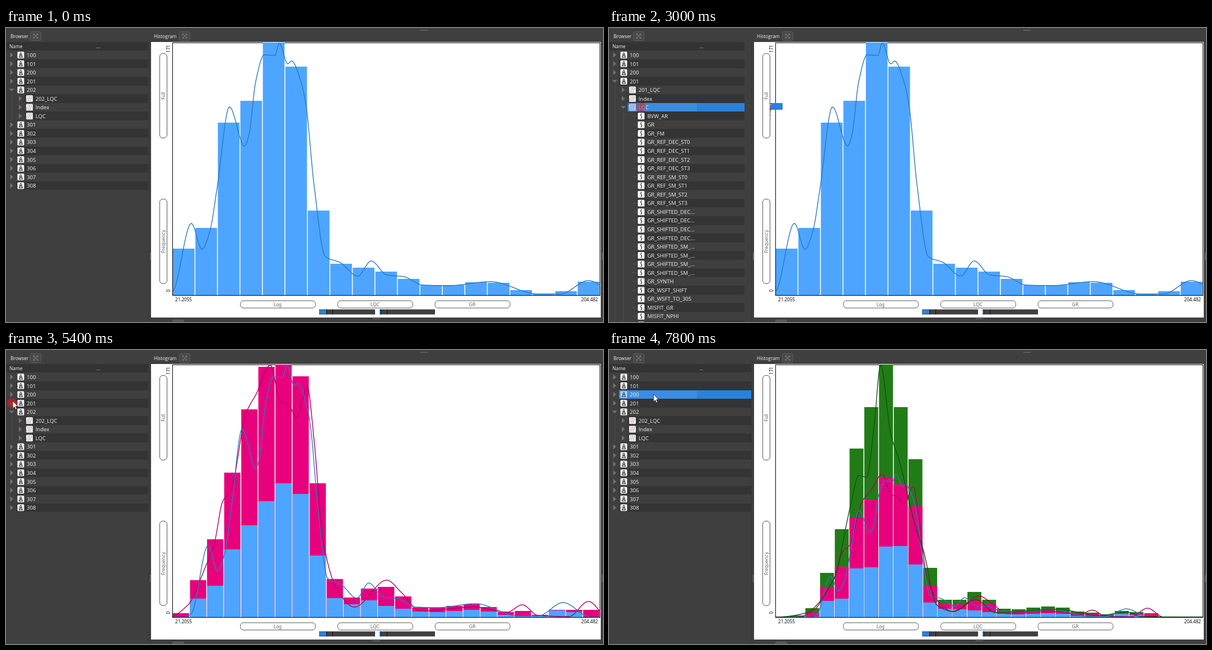
An HTML page for the animation above (8000 ms loop, 1066x525 px).

```html
<!DOCTYPE html>
<html lang="en">
<head>
<meta charset="utf-8">
<title>Histogram browser</title>
<style>
html, body { margin: 0; width: 100%; height: 100%; overflow: hidden; background: #3f3f3f; }
svg { display: block; width: 100%; height: 100%; }
text { font-family: "Open Sans", "Noto Sans", sans-serif; white-space: pre; }
.row { font-size: 9.55px; fill: #f4f4f4; }
.head { font-size: 8.4px; fill: #f4f4f4; }
.axis { font-size: 8.1px; fill: #000; }
.pill { font: 8px "DejaVu Sans", sans-serif; fill: #666; text-anchor: middle; }
</style>
</head>
<body>
<svg id="stage" viewBox="0 0 1066 525"></svg>
<script>
const NS = "http://www.w3.org/2000/svg";
const stage = document.getElementById("stage");

function add(parent, tag, attrs = {}, text) {
  const el = document.createElementNS(NS, tag);
  for (const k in attrs) el.setAttribute(k, attrs[k]);
  if (text !== undefined) el.textContent = text;
  parent.appendChild(el);
  return el;
}
const group = (parent = stage, attrs) => add(parent, "g", attrs);
const rect = (p, x, y, width, height, fill, more) => add(p, "rect", { x, y, width, height, fill, ...more });
const line = (p, d, stroke, width = 1) => add(p, "path", { d, fill: "none", stroke, "stroke-width": width });
const label = (p, cls, x, y, text, more) => add(p, "text", { class: cls, x, y, ...more }, text);
const show = (el, on) => { el.style.display = on ? "" : "none"; };

// ---------- window chrome ----------
const LIGHT = "#3f3f3f", DARK = "#343434", BLUE = "#2a82da";

function dockTitle(text, x, iconX) {
  label(stage, "head", x, 18.3, text);
  rect(stage, iconX + .5, 6.5, 19, 16, "#484848", { rx: 2, stroke: "#5c5c5c" });
  const c = iconX + 10;
  line(stage, `M${c - 3.5} 11l7 7M${c + 3.5} 11l-7 7`, "#8a8a8a");
  line(stage, `M${c - 4} 13v-2.5h2.5M${c + 4} 13v-2.5h-2.5M${c - 4} 16v2.5h2.5M${c + 4} 16v2.5h-2.5`, "#8a8a8a", .8);
}
function grip(x, y, vertical) {
  for (let i = 0; i < 6; i++)
    rect(stage, x + (vertical ? 0 : i * 2.3), y + (vertical ? i * 2.3 : 0), 1.2, 1.2, "#a0a0a0");
}

rect(stage, 0, 0, 1066, 525, LIGHT);
rect(stage, 254, 24, 1, 501, "#383838");
dockTitle("Browser", 8, 43);
dockTitle("Histogram", 264, 309);
grip(740, 3.5);
grip(655, 518.5);
grip(257, 401.5, true);
grip(1064, 401.5, true);
rect(stage, 297.5, 521.5, 20, 10, "#555", { rx: 2, stroke: "#6a6a6a" });

// ---------- tree ----------
const ROW = 15.55, TOP = 40.5, INDENT = 15.6;

function icon(g, level, x, y) {
  rect(g, x - 6, y - 6, 12, 12, "#f6f6f6", { rx: 1.5 });
  if (level === 0) {
    line(g, `M${x - 3} ${y + 4}l2.2 -8h1.6l2.2 8M${x - 3.6} ${y + 4}h7.2M${x - 1.6} ${y - .6}h3.2l-3.6 3.6M${x - 1.6} ${y - .6}l3.6 3.6`, "#333");
  } else if (level === 1) {
    ["#d88", "#999", "#89b"].forEach((c, i) => line(g, `M${x - 3.5 + i * 3} ${y - 5}q3 2.5 0 5t0 5`, c, .9));
  } else {
    line(g, `M${x + 1} ${y - 4.5}q-3 2.5 -.8 4.5t-.8 4.5`, "#222", 1.1);
  }
}

function makeTree(rows, width, sel) {
  const g = group(), picked = [];
  rect(g, 1, 25, width - 1, 15, "#333");
  label(g, "head", 6, 36, "Name");
  label(g, "head", 161.5, 36, "...");
  rows.forEach(([level, text, open], i) => {
    const top = TOP + i * ROW, y = top + ROW / 2, x = 18 + level * INDENT, ax = 10 + level * 15.5;
    const y0 = Math.round(top), h = Math.round(top + ROW) - y0;
    rect(g, x, y0, width - x, h, i % 2 ? DARK : LIGHT);
    if (i === sel)
      picked.push(rect(g, x, y0, width - x, h, BLUE), rect(g, x, y0, 157 - x, h, "#3a8de0"));
    for (let k = 0; k < level; k++) line(g, `M${10.5 + k * 15.5} ${top}v${ROW}`, "#545454", .8);
    if (level === 2) line(g, `M41.5 ${y}h9`, "#545454", .8);
    else add(g, "path", {
      d: open ? `M${ax - 4.8} ${y - 2.3}h9.6l-4.8 5z` : `M${ax - 2.6} ${y - 4.8}v9.6l5.6 -4.8z`,
      fill: "#707070"
    });
    icon(g, level, 26.4 + level * 15.5, y);
    if (i === sel) picked.push(rect(g, x + 2.4, y - 6, 12, 12, BLUE, { opacity: .35 }));
    label(g, "row", 37 + level * 15.7, y + 3.7, text);
  });
  return { g, select: on => picked.forEach(el => show(el, on)) };
}

const wells = (from, to) => Array.from({ length: to - from + 1 }, (_, i) => [0, `${from + i}`]);
const sets = (well, open) => [[0, well, true], [1, well + "_LQC"], [1, "Index"], [1, "LQC", open]];
const four = (stem, tail) => [0, 1, 2, 3].map(n => stem + (tail || n));
const curves = ["BVW_AR", "GR", "GR_FM", ...four("GR_REF_DEC_ST"), ...four("GR_REF_SM_ST"),
  ...four("GR_SHIFTED_DEC", "..."), ...four("GR_SHIFTED_SM_", "..."),
  "GR_SYNTH", "GR_WSFT_SHIFT", "GR_WSFT_TO_305", "MISFIT_GR", "MISFIT_NPHI", ""].map(n => [2, n]);
const first = [...wells(100, 101), ...wells(200, 200)], last = wells(301, 308);

const trees = [
  makeTree([...first, ...wells(201, 201), ...sets("202"), ...last], 254, 2),
  makeTree([...first, ...sets("201"), ...sets("202"), ...last], 254),
  makeTree([...first, ...sets("201", true), ...curves], 242, 6)
];

// ---------- plot panel ----------
const LEFT = 298, RIGHT = 1061, BASE = 477, FULL = 451;
rect(stage, 259, 25, 803, 492, "#fff");

function pill(x, y, w, h, text) {
  rect(stage, x + .5, y + .5, w, h, "#fff", { rx: 5.5, stroke: "#555" });
  const cx = x + w / 2, cy = y + h / 2 + .5;
  if (w > h) label(stage, "pill", cx, cy + 3, text);
  else label(stage, "pill", 0, 0, text, { transform: `translate(${cx + 3.5} ${cy})rotate(-90)` });
}
["Log", "LQC", "GR"].forEach((t, i) => pill(418 + i * 173.8, 486.5, 134, 13, t));
pill(274, 45, 13, 151, "Full");
pill(274, 305, 13, 151, "Frequency");
label(stage, "axis", 302, 488, "21.2055");
label(stage, "axis", 1057, 488, "204.482", { "text-anchor": "end" });
label(stage, "axis", 0, 0, "171", { transform: "translate(292.5 44)rotate(-90)" });
label(stage, "axis", 0, 0, "0", { transform: "translate(292.5 471.5)rotate(-90)" });

function slider(x, w, value) {
  rect(stage, x, 502.5, w, 9, "#404040");
  rect(stage, x, 503.5, value, 7, BLUE);
  for (const dx of [value, value + 11]) rect(stage, x + dx, 502.5, 1, 9, "#111");
}
slider(559, 100, 13);
slider(667, 99, 2);
rect(stage, 297.5, 26.5, 763, 451, "none", { stroke: "#000" });

// ---------- densities ----------
// A view maps the value axis to the screen: x = scale * value + shift.
const views = [
  { bins: 19, scale: 1, shift: 0 },
  { bins: 25, scale: .894, shift: 65 },
  { bins: 29, scale: .745, shift: 149 }
];

// Monotone cubic through a few turning points; zero outside them.
function density(keys) {
  const p = keys.split(" ").map(k => k.split(",").map(Number)).map(([x, y]) => [x, BASE - y]);
  const slope = i => (p[i + 1][1] - p[i][1]) / (p[i + 1][0] - p[i][0]);
  const tangent = p.map((_, i) => {
    if (!i || i === p.length - 1) return 0;
    const a = slope(i - 1), b = slope(i);
    return a * b > 0 ? 2 * a * b / (a + b) : 0;
  });
  return x => {
    const i = p.findIndex((k, n) => n < p.length - 1 && x >= k[0] && x < p[n + 1][0]);
    if (i < 0) return 0;
    const h = p[i + 1][0] - p[i][0], t = (x - p[i][0]) / h, u = 1 - t;
    return u * u * (1 + 2 * t) * p[i][1] + t * t * (3 - 2 * t) * p[i + 1][1]
      + h * t * u * (u * tangent[i] - t * tangent[i + 1]);
  };
}

const series = [
  { fill: "#4da5ff", stroke: "#2f78bd", home: views[0], gain: 1, f: density(
    "285,477 298,470 331,349 350,395 364,363 377,285 399,141 426,211 434,190 446,95 461,48 480,49 488,27 503,64 510,59 " +
    "527,97 536,140 550,280 570,408 597,419 628,443 652,416 680,441 710,444 745,459 790,460 865,453 950,475 990,475 1040,451 1095,477") },
  { fill: "#e8007d", stroke: "#b0005c", home: views[1], gain: 1, f: density(
    "290,477 325,455 355,390 372,345 387,270 402,250 428,115 447,78 472,27 490,92 504,97 519,120 538,66 550,160 " +
    "566,340 590,425 622,459 680,411 706,433 740,466 835,459 895,468 922,455 950,474 1005,476 1040,449 1075,477") },
  { fill: "#217c17", stroke: "#105510", home: views[2], gain: 1.764, f: density(
    "298,477 350,470 400,412 432,275 446,224 460,227 473,140 485,27 503,150 518,197 546,311 562,360 585,455 615,467 " +
    "655,446 690,469 800,463 875,474 925,468 950,476 1061,477") }
];

const clip = add(add(stage, "defs"), "clipPath", { id: "plot" });
rect(clip, LEFT, 26, RIGHT - LEFT, BASE - 26);

// Stacked bars are bin means of the densities; the tallest stack and curve fill the plot.
function makeChart(view, count) {
  const g = group(stage, { "clip-path": "url(#plot)" });
  const shown = series.slice(0, count);
  const lines = shown.map(({ f, home, gain }) => x =>
    gain * f((x - view.shift) / view.scale * home.scale + home.shift));
  const step = (RIGHT - LEFT) / view.bins, N = 40;
  const stacks = Array.from({ length: view.bins }, (_, bin) => {
    let sum = 0;
    return lines.map(f => {
      for (let k = 0; k < N; k++) sum += f(LEFT + (bin + (k + .5) / N) * step) / N;
      return sum;
    });
  });
  const barScale = FULL / Math.max(...stacks.flat());
  for (let s = count - 1; s >= 0; s--)
    stacks.forEach((stack, bin) => {
      const h = Math.round(stack[s] * barScale);
      rect(g, LEFT + bin * step, BASE - h, step - 1.5, h, shown[s].fill);
    });

  const xs = Array.from({ length: RIGHT - LEFT + 1 }, (_, i) => LEFT + i);
  const lineScale = (FULL - 1) / Math.max(...lines.flatMap(f => xs.map(f)));
  [1, 0, 2].filter(s => s < count).forEach(s => {
    const pts = xs.map(x => `${x} ${(BASE - lines[s](x) * lineScale).toFixed(1)}`);
    line(g, "M" + pts.join("L"), shown[s].stroke, 1.4);
  });
  return g;
}
const charts = views.map((view, i) => makeChart(view, i + 1));

// ---------- pointer, click ring, dragged item ----------
const ring = add(stage, "circle", { r: 9, fill: "#d01820" });
const drag = group();
rect(drag, 0, 0, 24, 12, BLUE);
rect(drag, 0, 1, 1.2, 9, "#dcebfa");
rect(drag, 2.5, 2, 1, 2, "#dcebfa");
rect(drag, 2, 15, 1.2, 1.2, "#777");
rect(drag, 2, 21, 1.2, 1.2, "#777");
const spark = line(drag, "M2 5v3M3.5 8v3M2 12v2", "#d8383c", 1.4);
const cursor = add(stage, "path", {
  d: "M0 0V13.2L3 10.4L5.1 15.2L7.2 14.3L5.2 9.6H9.2Z",
  fill: "#fff", stroke: "#222", "stroke-width": .8, "stroke-linejoin": "round"
});

// ---------- timeline ----------
const LOOP = 8000, TICK = 200;
const expander = [10, 92], lqc = [26, 139], parked = [687.5, 183], dropped = [661, 156];

// A move glides from a to b between two times, then rests until `end`.
const move = (start, stop, end, a, b) => ({ start, stop, end, a, b });
const cursorMoves = [
  move(200, 1200, 1400, [80, 316], expander),
  move(1400, 1800, 1800, expander, lqc),
  move(1800, 2000, 2000, lqc, [41, 152]),
  move(2000, 2200, 2600, [41, 152], [56, 137]),
  move(3800, 4000, 4000, [678, 181], parked),
  move(4000, 4800, 5400, parked, [12, 91]),
  move(5400, 6000, 6200, [12, 91], [45, 76]),
  move(7400, 7800, LOOP, dropped, [79.5, 79])
];
const dragMoves = [
  move(3000, 3400, 3800, [286, 134], [665, 177]),
  move(6200, 6800, 7400, [120, 90], dropped)
];
const clicks = [
  { start: 1200, end: 1600, at: [12, 95], alpha: .75 },
  { start: 1800, end: 2200, at: [27, 141.5], alpha: .75 },
  { start: 2400, end: 3200, at: [57, 141.5], alpha: .5 },
  { start: 5000, end: 5600, at: [11, 95], alpha: .75 },
  { start: 6000, end: 6400, at: [45, 79.5], alpha: .5 }
];

const active = (list, t) => list.find(m => t >= m.start && t < m.end);
const ease = k => k * k * (3 - 2 * k);

function position(moves, t) {
  const m = active(moves, t);
  if (!m) return null;
  const k = ease(Math.min(1, (t - m.start) / (m.stop - m.start)));
  return m.a.map((v, i) => v + (m.b[i] - v) * k);
}
function place(el, pos) {
  show(el, pos);
  if (pos) el.setAttribute("transform", `translate(${pos})`);
}

function render(ms) {
  const t = Math.floor(ms / TICK) * TICK;
  const tree = t < 1400 || t >= 5200 ? 0 : t < 1800 ? 1 : 2;
  const chart = t < 3800 ? 0 : t < 7400 ? 1 : 2;
  const selected = t >= 6000 || (t >= 2400 && t < 5200);
  trees.forEach((item, i) => { show(item.g, i === tree); item.select(selected); });
  charts.forEach((g, i) => show(g, i === chart));
  place(cursor, position(cursorMoves, t));
  place(drag, position(dragMoves, t));
  const click = active(clicks, t);
  place(ring, click && click.at);
  if (click) ring.setAttribute("opacity", click.alpha);
  show(spark, click);
}

const start = performance.now();
function tick() {
  render((performance.now() - start) % LOOP);
  requestAnimationFrame(tick);
}
tick();
</script>
</body>
</html>
```
